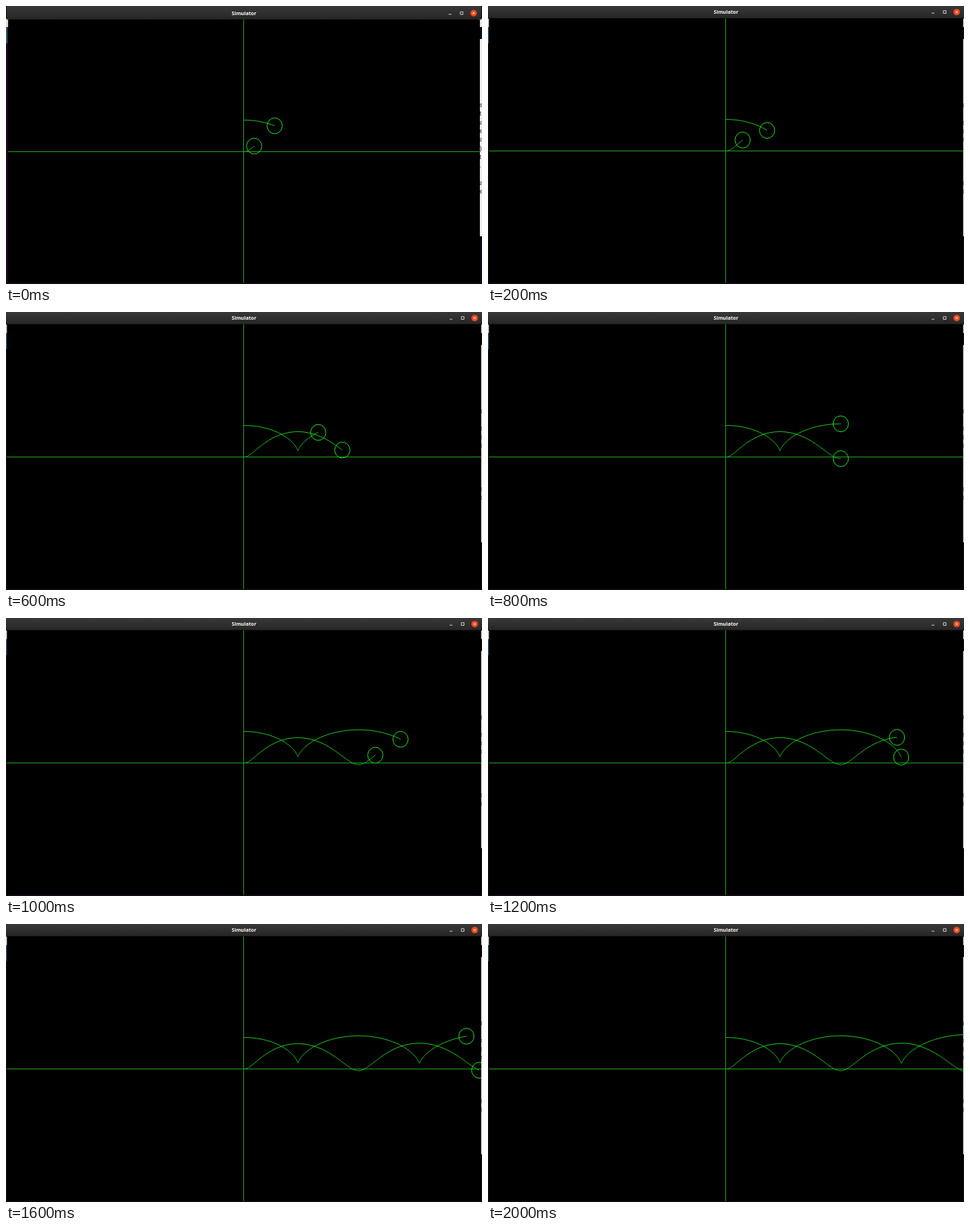
Recreate the animation shown at these times as an HTML page. Size 676 by 396 pixels, loop 2200 ms.

```html
<!DOCTYPE html>
<html lang="en">
<head>
<meta charset="utf-8">
<title>Simulator</title>
<style>
  html, body { margin: 0; width: 100%; height: 100%; overflow: hidden; background: #000; }
  #stage { display: block; width: 676px; height: 396px; }
  .title { font: bold 7.1px "Open Sans", "Noto Sans", sans-serif; fill: #fff; text-anchor: middle; }
  .page { font: 9px "Liberation Sans", sans-serif; fill: #333; }
  .axis { stroke: #20a020; stroke-width: 1; }
  .trail { fill: none; stroke: #1fd01f; stroke-width: 1; }
  .ball { fill: none; stroke: #22e022; stroke-width: 1; }
</style>
</head>
<body>
<svg id="stage" viewBox="0 0 676 396">
  <defs>
    <linearGradient id="barFill" x2="0" y2="1">
      <stop offset="0" stop-color="#3a3836"/>
      <stop offset="1" stop-color="#282625"/>
    </linearGradient>
  </defs>

  <!-- desktop behind the window -->
  <rect width="676" height="396" fill="#180a18"/>
  <rect y="18" width="4" height="12" fill="#ddd"/>
  <rect y="30" width="2" height="23" fill="#2b5f6b"/>
  <rect x="670" y="18" width="6" height="12" fill="#e6e6e6"/>
  <rect x="670" y="30" width="6" height="17" fill="#0c0c1c"/>
  <rect x="670" y="47" width="6" height="281" fill="#eee"/>
  <rect x="670" y="328" width="6" height="68" fill="#0c0c1c"/>
  <g id="page" class="page"></g>

  <rect id="bar" fill="url(#barFill)"/>
  <g id="chrome">
    <text class="title" x="338" y="11">Simulator</text>
  </g>
  <g id="buttons" fill="none" stroke="#ddd" stroke-width=".9">
    <path d="M630 10.2h4M646.7 6.7h3.8v3.8h-3.8z"/>
    <circle cx="665.6" cy="8.6" r="4.7" fill="#e8481f" stroke="none"/>
    <path d="M664 7l3.2 3.2M667.2 7l-3.2 3.2" stroke="#fff"/>
  </g>

  <svg id="scene">
    <rect width="676" height="420" fill="#000"/>
    <path class="axis" d="M0 206.5H676M337.5 0V400"/>
    <path id="trailA" class="trail"/>
    <path id="trailB" class="trail"/>
    <ellipse id="ballA" class="ball" rx="10.8" ry="11.3"/>
    <ellipse id="ballB" class="ball" rx="10.8" ry="11.3"/>
  </svg>
</svg>
<script>
const $ = id => document.getElementById(id);
const set = (id, attrs) => {
  for (const name in attrs) $(id).setAttribute(name, attrs[name]);
};

const LOOP = 2200, STEP = 100, START_X = 338, CENTER_Y = 184.1;

// Turning points of the orbit: [x of the common centre, distance from it]
const turns = [[338, 22.5], [414.5, 13.6], [501, 24.8], [587, 14.3], [682, 26.6], [785, 15]];

// Drift of the common centre: [ms, x]
const drift = [[0, 367], [200, 379], [400, 420], [800, 501], [1200, 583.8], [1600, 663], [2200, 784]];

const segment = (list, v) => {
  let i = 0;
  while (i < list.length - 2 && v >= list[i + 1][0]) i++;
  return i;
};

function centerAt(ms) {
  const i = segment(drift, ms), [t0, x0] = drift[i], [t1, x1] = drift[i + 1];
  return x0 + (x1 - x0) * (ms - t0) / (t1 - t0);
}

// Half of a Kepler ellipse between two neighbouring turning points
function bodies(x) {
  const i = segment(turns, x), [x0, r0] = turns[i], [x1, r1] = turns[i + 1];
  const a = (r0 + r1) / 2, e = Math.abs(r0 - r1) / (r0 + r1);
  const mean = Math.PI * ((x - x0) / (x1 - x0) + i % 2);
  let angle = mean;
  for (let n = 0; n < 8; n++)
    angle -= (angle + e * Math.sin(angle) - mean) / (1 + e * Math.cos(angle));
  const dx = a * Math.sqrt(1 - e * e) * Math.sin(angle);
  const dy = -a * (e + Math.cos(angle));
  return [[x + dx, CENTER_Y + dy], [x - dx, CENTER_Y - dy]];
}

function placeWindow(small) {
  const left = small ? 3 : 1.3, right = small ? 673 : 674.8;
  const top = small ? 19.3 : 17.4, bottom = small ? 394 : 394.6;
  const width = right - left, height = bottom - top;
  set("bar", { x: small ? 1 : 0, y: 0, width: small ? 674 : 676, height: top });
  set("chrome", { transform: `translate(0 ${small ? 2 : 0})` });
  set("buttons", { transform: small ? "translate(-1.5 1.6)" : "" });
  set("scene", {
    x: left, y: top, width, height,
    viewBox: `${left} ${small ? top - 1 : top} ${width} ${height}`
  });
}

function placeBodies(x) {
  const paths = [[], []];
  const add = at => bodies(at).forEach((p, i) => paths[i].push(p.map(v => v.toFixed(2))));
  for (let at = START_X; at < x; at++) add(at);
  add(x);
  ["A", "B"].forEach((name, i) => {
    const [cx, cy] = paths[i].at(-1);
    set("trail" + name, { d: "M" + paths[i].join("L") });
    set("ball" + name, { cx, cy });
  });
}

[..."staea)t.", "", "a", "e"].forEach((letter, i) => {
  const text = document.createElementNS("http://www.w3.org/2000/svg", "text");
  text.textContent = letter;
  text.setAttribute("x", 672.5);
  text.setAttribute("y", 144 + i * 12.3);
  $("page").append(text);
});

let shown = -1;
function draw() {
  const step = Math.floor(performance.now() % LOOP / STEP);
  if (step !== shown) {
    shown = step;
    placeWindow(step === 0);
    placeBodies(centerAt(step * STEP));
  }
  requestAnimationFrame(draw);
}
draw();
</script>
</body>
</html>
```
